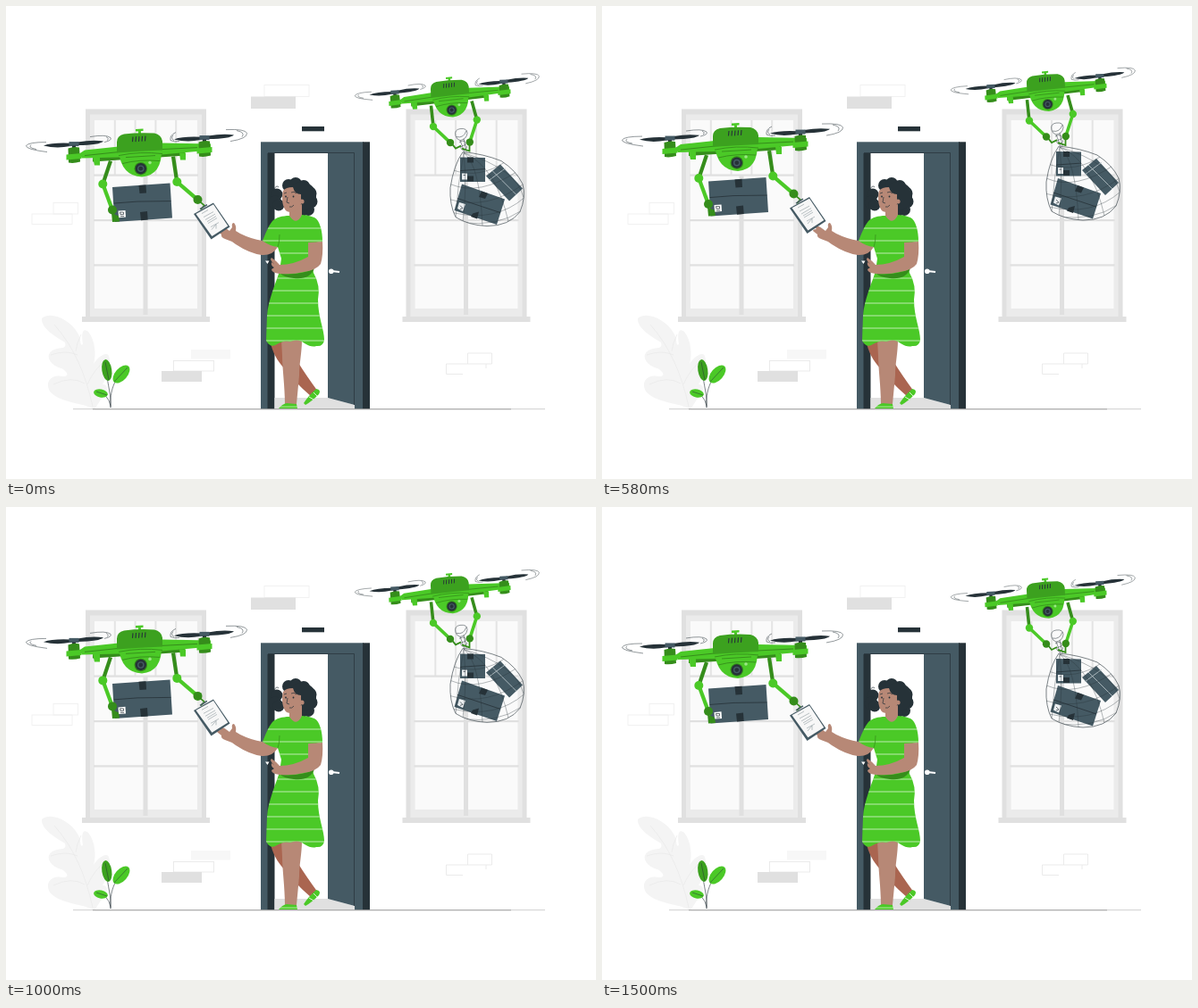
Animation, 660 px wide and 530 px high, one loop 1540 ms. Source, as an HTML page with a canvas:

```html
<!DOCTYPE html>
<html lang="en">
<head>
<meta charset="utf-8">
<title>Drone delivery</title>
<style>
html, body { margin: 0; width: 100%; height: 100%; overflow: hidden; background: #fff; }
canvas { display: block; }
</style>
</head>
<body>
<canvas id="stage" width="660" height="530"></canvas>
<script>
const ctx = document.getElementById('stage').getContext('2d');
const GREEN = '#4bc927', MOSS = '#3ca11f', LEAF = '#358d1b', SLATE = '#455a64', INK = '#263238';
const SKIN = '#b78876', SHADE = '#aa6550', GREY = '#e0e0e0';
const LOOP = 1540, STEP = 41.62, LIFT = 8.6;

const paths = new Map();
function shape(d) {
  if (!paths.has(d)) paths.set(d, new Path2D(d));
  return paths.get(d);
}
function fill(d, color) {
  ctx.fillStyle = color;
  ctx.fill(shape(d));
}
function line(d, color = INK, width = 0.7) {
  ctx.strokeStyle = color;
  ctx.lineWidth = width;
  ctx.stroke(shape(d));
}
function rect(x, y, w, h, color) {
  ctx.fillStyle = color;
  ctx.fillRect(x, y, w, h);
}
function frame(x, y, w, h, color) {
  ctx.strokeStyle = color;
  ctx.lineWidth = 0.9;
  ctx.strokeRect(x, y, w, h);
}
function oval(x, y, rx, ry, color, turn = 0) {
  ctx.beginPath();
  ctx.ellipse(x, y, rx, ry, turn, 0, 7);
  ctx.fillStyle = color;
  ctx.fill();
}
const dot = (x, y, r, color) => oval(x, y, r, r, color);
function clipped(d, draw) {
  ctx.save();
  ctx.clip(shape(d));
  draw();
  ctx.restore();
}

function windowAt(x) {
  ctx.save();
  ctx.translate(x, 0);
  rect(0, 115.5, 135, 233, GREY);
  rect(5, 121.5, 125, 226.5, '#ebebeb');
  rect(10, 128, 115, 211, '#fafafa');
  for (let i = 1; i < 5; i++) rect(9 + i * 22.8, 128, 2, 61, '#e4e4e4');
  rect(64.5, 190, 5, 156, GREY);
  for (const y of [188.5, 239, 289.3]) rect(9, y, 117, 2.2, GREY);
  rect(-4, 348, 143, 6, GREY);
  ctx.restore();
}

function wall() {
  frame(289, 88.5, 50, 13, '#f0f0f0');
  rect(274, 101.5, 50, 13.5, GREY);
  frame(53, 220.5, 27.5, 12.5, '#f0f0f0');
  frame(29, 233, 45, 11.5, '#f0f0f0');
  rect(207, 385, 44, 10.5, '#f7f7f7');
  frame(187.5, 397.5, 45, 11.5, '#e8e8e8');
  rect(174, 409, 45, 12, GREY);
  line('M516.5 401V389H543.5V401H492.5V412.5H511M537 401V406', '#e9e9e9', 0.9);
  rect(331, 135, 25, 5.3, INK);
  windowAt(89);
  windowAt(447.5);
}

function plants() {
  fill('M99 452C86 444 64 446 50 433C42 421 51 412 64 415C72 415 68 409 62 406C47 402 43 389 54 385C62 382 68 385 66 377C56 371 39 361 40 350C50 341 72 352 80 366C85 374 82 382 86 379C84 366 86 360 92 365C100 374 101 392 98 401C102 394 112 386 115 392C119 404 112 418 108 424C116 424 114 434 106 441Z', '#f4f4f4');
  line('M54 357Q85 392 97 449M50 391Q67 385 80 391M53 424Q73 414 88 423M84 368Q79 378 78 387M112 397Q99 406 91 424', '#e8e8e8', 0.7);
  line('M112 408C114 426 118 437 117 450M132 407C119 421 116 435 117 450M102 433Q114 434 117 448', INK, 0.6);
  oval(112.8, 408, 5.5, 12, MOSS, -0.15);
  oval(129, 412.5, 6.8, 12, GREEN, 0.72);
  oval(106, 434, 8, 4.6, GREEN, 0.2);
  line('M111 399L115 419M136 405L121 421M101 432L113 436', INK, 0.5);
}

function door() {
  rect(285, 152.3, 115, 299.7, SLATE);
  rect(399, 152.3, 8, 299.7, INK);
  rect(293, 165, 97, 287, '#fff');
  rect(292.5, 165, 8, 287, INK);
  fill('M300.5 439H360L390 447V452H300.5Z', GREY);
  fill('M360 165H390V447L360 439Z', SLATE);
  line('M293 164.5H389.5V447', INK, 0.7);
  dot(363.8, 297.2, 2.8, '#fff');
  line('M364 297L373 298', '#fff', 1.8);
  fill('M290 285.5L294.5 285.5L292.5 289Z', '#fff');
}

const DRESS = 'M317 235C309 235 302 237 298 241C293 247 290 256 287 263Q295 269 304 270L308 283L306 297C302 310 293 330 292 347L291 375Q296 384 303 379Q311 374 318 376Q327 372 334 378Q342 383 347 381Q355 382 356 374C356 362 349 349 349 329Q352 313 344 299L340 279L340 266L354 264C354 252 351 240 345 237Q338 234 331 234Q325 247 317 235Z';
function stripes() {
  ctx.strokeStyle = '#dbf4d4';
  ctx.lineWidth = 0.8;
  ctx.beginPath();
  for (let y = 249; y < 380; y += 14) {
    ctx.moveTo(284, y);
    ctx.lineTo(360, y);
  }
  ctx.stroke();
}

function hair() {
  const curls = [316, 201, 7, 324, 199, 7, 333, 202, 7, 340, 210, 7.5, 341, 219, 7.5, 338, 228, 7,
    331, 230, 6, 331, 213, 16, 303, 211, 6.5, 301, 220, 7.5, 305, 223, 6.5];
  for (let i = 0; i < curls.length; i += 3) dot(curls[i], curls[i + 1], curls[i + 2], INK);
  line('M300 206Q302 200 305 203', INK, 0.7);
}

function woman() {
  fill('M296 378L313 374Q322 395 349 432L342 438Q322 421 307 401Q299 391 296 378Z', SHADE);
  fill('M308 374H331C331 389 328 400 328 414L325 446H312C312 427 309 405 309 392Z', SKIN);
  fill('M333 445Q338 437 347 429Q353 430 350 435Q342 443 335 447Z', GREEN);
  line('M339 438L344 441M344 433L348 437', '#fff', 0.8);
  fill('M305 451Q309 446 314 445L325 446L326 451Z', GREEN);
  line('M306 449L326 449', '#d8f5cd', 0.7);
  hair();
  fill('M317 228L331 222L331 235Q332 246 324 246Q317 245 317 238Z', SKIN);
  fill('M287 263Q274 261 262 255L257 252Q258 246 255 243Q252 243 253 248L250 252Q244 247 238 245Q235 246 240 250Q236 250 236 252L241 256Q240 259 245 261Q252 263 257 267Q272 277 286 279Q298 280 304 270Z', SKIN);
  fill(DRESS, GREEN);
  clipped(DRESS, stripes);
  fill('M310 207C308 215 309 226 314 230C321 233 328 229 330 222L330 211Q323 211 321 203Q313 203 310 207Z', SKIN);
  dot(331, 219, 2.6, SKIN);
  line('M311 210L314 209M319 209Q322 207 325 210M315 214L314 220L317 221M317 225Q320 226 322 223', INK, 0.7);
  dot(313, 213.5, 0.9, INK);
  dot(321.5, 213.5, 0.9, INK);
  fill('M307 300Q330 302 345 294Q340 307 322 305Q311 304 307 300Z', LEAF);
  fill('M338 265L354 264Q355 279 352 289Q347 296 333 298Q321 301 306 300Q297 299 297 295L300 293Q296 291 297 287L300 289Q294 284 297 282Q303 286 306 290Q322 290 338 281Z', SKIN);
  line('M306 256Q306 265 304 270', LEAF, 0.7);
}

function propeller(x, y) {
  ctx.save();
  ctx.translate(x, y);
  fill('M-34 1.8Q-24 -1.8 -4 -.9L4 -2Q20 -5 33 -3.2Q29 1 4 1.5L-4 2.4Q-20 5.5 -34 1.8Z', INK);
  rect(-5.5, -2.5, 11, 5, SLATE);
  rect(-2, 2, 4, 4, INK);
  fill('M-6.5 5Q0 2.5 6 4L7 20Q0 22 -6 21Z', LEAF);
  fill('M-8.5 12L8.5 10.5V16.5L-8.5 18Z', GREEN);
  ctx.restore();
}

function drone() {
  fill('M97 170L200 164L201 168L97 175Z', LEAF);
  fill('M97 170H105V179H99ZM194 165H201V173H195Z', GREEN);
  fill('M82 166L88 162L126 158L174 154L229 155L229 162L174 167L126 170L85 171Z', GREEN);
  line('M88 168L126 164M174 161L214 159', LEAF, 1);
  propeller(76, 155);
  propeller(222, 148);
  line('M45 153Q25 153 22.5 157Q22 161 46 164M28 156Q24 159 34 161M94 147Q112 144 117 148Q119 151 110 153M112 147Q116 149 113 151', INK, 0.5);
  line('M190 142Q183 145 184 151Q188 153 194 152M187 145Q184 149 188 151M246 139Q268 138 269.5 143Q270 149 251 152M258 140Q268 142 264 147', INK, 0.5);
  fill('M148 139H151V145H148ZM145 138.5L153.5 138V140.5L145 141Z', GREEN);
  fill('M126 163L174 160Q175 190 152 192Q129 191 126 163Z', GREEN);
  fill('M124 165V153Q124 146 132 144Q148 142 166 143Q174 145 175 152V162Q150 163 124 165Z', MOSS);
  line('M126 168Q150 163 175 166M130 177Q149 172 172 174M134 170L167 168', LEAF, 0.9);
  line('M142 147L141.5 152.5M145.5 146.7L145 152.5M149 146.5L148.5 152.3M152.5 146.3L152 152M156 146L155.5 151.8', INK, 1.1);
  dot(150.8, 182.6, 7.3, LEAF);
  dot(150.8, 182.6, 6.2, INK);
  dot(150.8, 182.6, 3.8, SLATE);
  dot(150.8, 182.6, 2.4, INK);
  dot(161, 176, 1.8, '#9be586');
}

function limb(x1, y1, x2, y2, x3, y3, r) {
  line(`M${x1} ${y1}L${x2} ${y2}`, LEAF, r * 0.85);
  line(`M${x2} ${y2}L${x3} ${y3}`, GREEN, r * 0.85);
  dot(x2, y2, r, GREEN);
  dot(x3, y3, r, LEAF);
}

function parcel() {
  fill('M119 203.5L183.5 199L186 238L121.5 242.5Z', SLATE);
  line('M120.5 221.5L147 219.5L184.5 219', INK, 0.8);
  fill('M148.5 201.4L156.5 200.8L157 210L149.5 210.5ZM150 231.5L158 230.5L158.7 240L151 240.6Z', INK);
  fill('M125.5 230L133.5 229.4L134 237L126 237.6Z', '#fff');
  line('M127.5 231.5H131.5V234H128ZM128 236H132', INK, 0.7);
}

function clipboard() {
  fill('M210 233.5L232 221L250.5 248L229.5 262Z', SLATE);
  fill('M212.5 233.3L232 222.6L248.3 247L230.4 258.4Z', '#f7f7f7');
  line('M219 233L226 229M221 237L232 231M223 240L234 233.5M225 242L235 236M226 244L236 238M229 248L238 243M230 251L235 245L235 250', '#8f9a9f', 0.6);
  line('M215 218L222 224L218 228', LEAF, 1.6);
  line('M217 228L225 223', SLATE, 1.4);
}

function leftDrone() {
  drone();
  parcel();
  limb(117, 174, 108.3, 200, 119, 229, 5);
  fill('M118 232L126 236L127 242L119 242.5Z', LEAF);
  limb(187, 169, 191.3, 197.5, 214.5, 217.5, 5);
  clipboard();
}

const BAG = 'M511 163Q501 177 497 203Q496 222 503 236Q517 245 538 246Q563 246 575 230Q582 213 578 199Q571 184 554 173Q534 165 511 163Z';
function net() {
  line('M512 164Q530 177 533 246M512 164Q548 179 562 241M512 164Q571 182 579 214M512 164Q516 202 511 241M512 164Q505 200 503 237', INK, 0.35);
  line('M499 183Q530 194 560 173M497 199Q530 213 573 184M496 216Q539 229 580 198M500 231Q548 242 580 214M510 242Q550 247 576 229', INK, 0.35);
}

function cargo() {
  ctx.save();
  ctx.translate(0, 1);
  fill('M508 169L536 169.5V196.5L508 196.5Z', SLATE);
  fill('M553 177L578 204L563 218L537 190Z', SLATE);
  fill('M510 199L558 216L549 244.5L501.5 228.5Z', SLATE);
  line('M508 184L536 182M505 215L553 231', INK, 0.8);
  line('M544 184L571 211M540 195L559 181', '#c5ced2', 0.8);
  fill('M516 169H523V175H516ZM516 190H523V196H516ZM532 207L539 209.5L536 215.5L529 213.5ZM522 232L529 230L527 238L520 235.5Z', INK);
  fill('M510 187H516V194H510ZM507 219.5L514 221.5L511 229.5L505 226.5Z', '#eceff1');
  line('M511.5 189H514M508 223L511 226L508 227', INK, 0.7);
  clipped(BAG, net);
  line(BAG, INK, 0.6);
  line('M503 145Q501 138 508 137Q516 136 516 142Q515 149 508 150Q504 149 503 145ZM504 146Q512 148 515 139M508 150L513 163M512 148L515 163M507 152Q515 148 514 155Q505 157 511 161Q517 159 515 156', INK, 0.5);
  ctx.restore();
}

function rightDrone() {
  ctx.save();
  ctx.translate(435.8, 107);
  ctx.rotate(-0.049);
  ctx.scale(0.838, 0.838);
  ctx.translate(-76.5, -167);
  drone();
  ctx.restore();
  cargo();
  limb(475.5, 112, 478, 135.5, 497, 153.5, 4.2);
  limb(521, 107, 526.8, 128, 518.8, 153, 4.2);
  line('M499 155L503 160L509 157M518.5 155V163L510 160', LEAF, 1.8);
}

function lift(time) {
  const tick = Math.floor((time % LOOP + 4) / STEP);
  return -LIFT * Math.max(0, 1 - Math.abs(tick - 17.6) / 18.5);
}

function draw(time) {
  ctx.clearRect(0, 0, 660, 530);
  wall();
  plants();
  door();
  line('M75 451.6H603', '#c4c4c4', 0.8);
  line('M97 451.8H565', '#8c8c8c', 0.7);
  woman();
  ctx.save();
  ctx.translate(0, lift(time));
  leftDrone();
  rightDrone();
  ctx.restore();
}

const start = performance.now();
function tick() {
  draw(performance.now() - start);
  requestAnimationFrame(tick);
}
tick();
</script>
</body>
</html>
```
